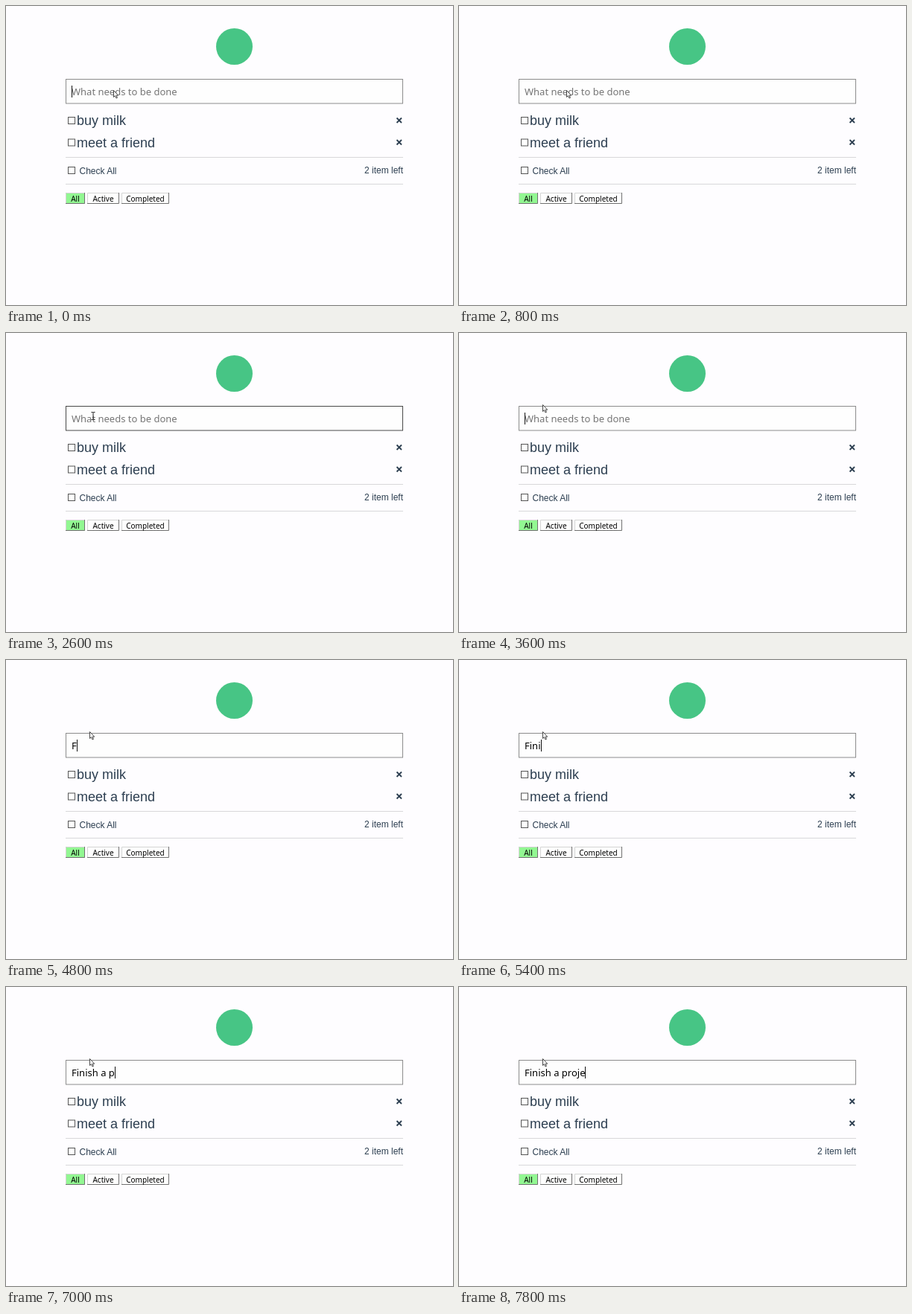
These frames come from a looping animation (600 by 402 pixels, 8000 ms). An HTML page:

```html
<!DOCTYPE html>
<html lang="en">
<head>
<meta charset="utf-8">
<title>Todo list</title>
<style>
  html, body { margin: 0; width: 100%; height: 100%; overflow: hidden; background: #fefdff; }
  svg { display: block; width: 100%; height: 100%; }
  text { font-family: "Liberation Sans", Arial, sans-serif; fill: #2c3e50; white-space: pre; }
  .item { font-size: 18px; }
  .note { font-size: 12px; }
  .field { font: 13px "Noto Sans", sans-serif; }
  .button text { font: 10px "Noto Sans", sans-serif; fill: #000; }
  .box { fill: #fff; stroke: #555; }
  .rule { stroke: #d8d8da; }
  .cross { stroke: #2c3e50; stroke-width: 1.8; }
</style>
</head>
<body>
<svg viewBox="0 0 600 402">
  <circle cx="306.5" cy="54.5" r="24.5" fill="#47c585"/>

  <rect id="input" x="80.5" y="98.5" width="452" height="32.5" fill="#fefefe"/>
  <text id="value" class="field" x="88" y="120"></text>
  <path id="caret" d="M.5 107V123" stroke="#111"/>

  <rect class="box" x="83.5" y="149.5" width="9" height="9"/>
  <text class="item" x="95" y="160">buy milk</text>
  <path class="cross" d="M524.5 150.5l6.5 6.5m0 -6.5l-6.5 6.5"/>

  <rect class="box" x="83.5" y="179" width="9" height="9"/>
  <text class="item" x="95" y="189.5">meet a friend</text>
  <path class="cross" d="M524.5 180l6.5 6.5m0 -6.5l-6.5 6.5"/>

  <path class="rule" d="M80 203.5H533M80 239.5H533"/>
  <rect class="box" x="83.5" y="216.5" width="9" height="9"/>
  <text class="note" x="98.5" y="226">Check All</text>
  <text class="note" x="533" y="225" text-anchor="end">2 item left</text>

  <g id="buttons"></g>

  <path id="arrow" d="M.5 .5V9.5L2.5 7.7L4 11L5.5 10.3L4 7.2H6.7Z" fill="#fff" stroke="#333" stroke-width=".9"/>
  <path id="beam" d="M114.5 106.5h2l.5 .5l.5 -.5h2M117 107V116M114.5 116.5h2l.5 -.5l.5 .5h2" fill="none" stroke="#222"/>
</svg>
<script>
const LOOP = 8000;
const PLACEHOLDER = "What needs to be done";
const PHRASE = "Finish a proje";
const $ = id => document.getElementById(id);

function addButton(label, x, width, fill) {
  $("buttons").innerHTML += `<g class="button" transform="translate(${x} 251)">
    <rect width="${width}" height="15" fill="${fill}"/>
    <path d="M.5 15V.5H${width}" fill="none" stroke="#d4d4d4"/>
    <path d="M0 14.5H${width - .5}V0" fill="none" stroke="#707070"/>
    <text x="${width / 2}" y="11.5" text-anchor="middle">${label}</text>
  </g>`;
}
addButton("All", 80, 26, "#92f792");
addButton("Active", 109, 43, "#fefefe");
addButton("Completed", 155, 64, "#fefefe");

const within = (t, from, to) => t >= from && t < to;

// One key per 200 ms, with a pause after the fourth letter.
function typedLength(t) {
  if (t < 4800) return 0;
  if (t < 6000) return Math.min(4, 1 + Math.floor((t - 4800) / 200));
  return Math.min(PHRASE.length, 5 + Math.floor((t - 6000) / 200));
}

function pointerPosition(t) {
  if (t < 2000) return [144, 113];
  if (t < 2600) return [68, 98];
  return [112, 96];
}

function draw(t) {
  const typed = PHRASE.slice(0, typedLength(t));
  const focused = !within(t, 2400, 3400);
  const caretOn = focused && !within(t, 800, 1200) && !within(t, 2000, 2400) && !within(t, 3800, 4200);
  const overField = within(t, 2600, 3600);

  $("value").textContent = typed || PLACEHOLDER;
  $("value").style.fill = typed ? "#000" : "#757575";
  const end = typed ? $("value").getComputedTextLength() : 0;
  $("caret").setAttribute("transform", `translate(${Math.round(88 + end)} 0)`);
  $("caret").style.opacity = caretOn ? 1 : 0;
  $("input").style.stroke = focused ? "#8c8c8c" : "#484848";

  $("arrow").setAttribute("transform", `translate(${pointerPosition(t)})`);
  $("arrow").style.opacity = overField ? 0 : 1;
  $("beam").style.opacity = overField ? 1 : 0;
}

const start = performance.now();
function frame() {
  draw((performance.now() - start) % LOOP);
  requestAnimationFrame(frame);
}
frame();
</script>
</body>
</html>
```
